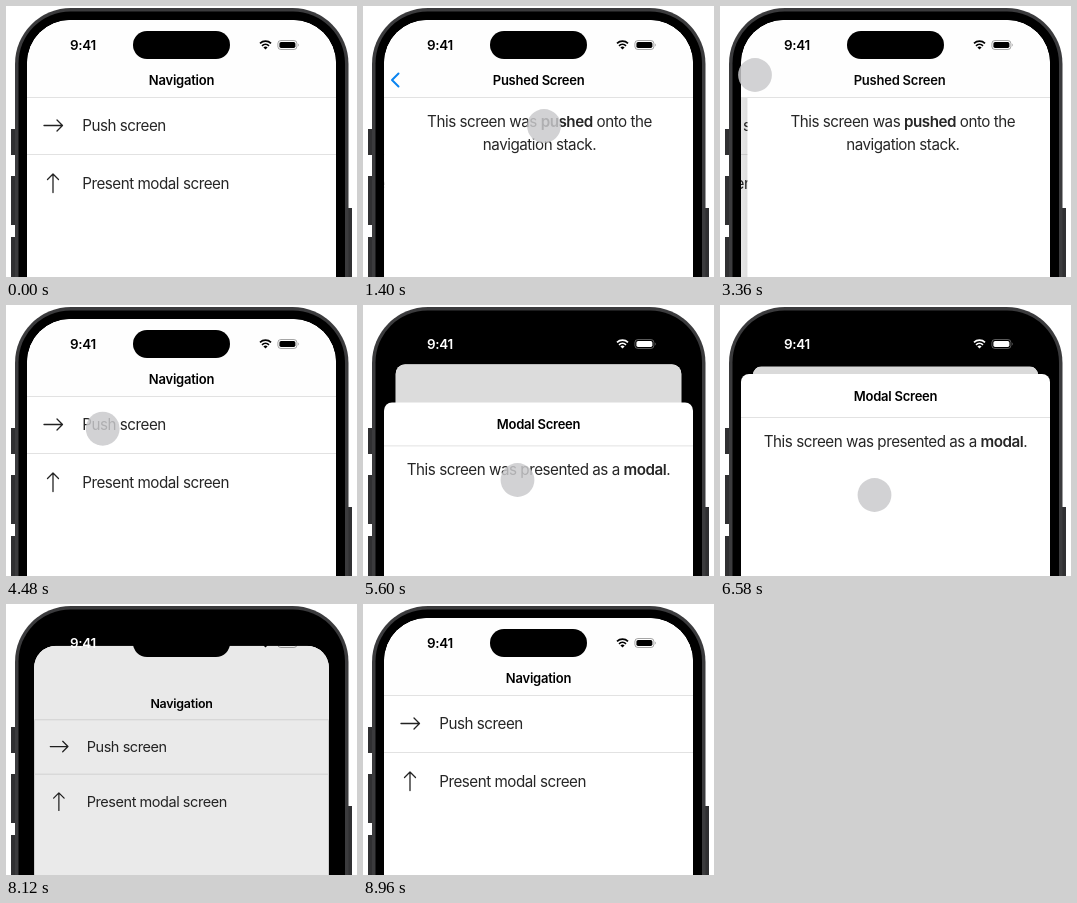
Animation, 351 px wide and 271 px high, one loop 9430 ms. Source, as an HTML page:

```html
<!DOCTYPE html>
<html lang="en">
<head>
<meta charset="utf-8">
<title>Stack navigation</title>
<style>
  html, body { margin: 0; width: 100%; height: 100%; overflow: hidden; background: #fff; }
  svg { display: block; font-family: Inter, "Liberation Sans", sans-serif; }
  text { font-size: 15.2px; letter-spacing: -.031em; fill: #262626; }
  .mid { text-anchor: middle; }
  .title { font-size: 13px; font-weight: 600; letter-spacing: -.018em; fill: #000; }
  .bold { font-weight: 600; }
  .line { stroke: #e2e2e2; }
  .icon { fill: none; stroke: #222; stroke-width: 1.3; stroke-linecap: round; stroke-linejoin: round; }
</style>
</head>
<body>
<svg width="351" height="271" viewBox="0 0 351 271">
  <defs>
    <clipPath id="screenClip"><rect x="21" y="14" width="309" height="400" rx="43"/></clipPath>
    <clipPath id="cardClip"><rect id="cardShape" x="21" y="14" width="309" height="600"/></clipPath>
    <linearGradient id="edge"><stop stop-opacity="0"/><stop offset="1" stop-opacity=".07"/></linearGradient>
  </defs>

  <!-- phone body -->
  <path d="M5 123h6v26H5zM5 170h6v49H5zM5 231h6v49H5zM340 202h6v80h-6z" fill="#303032"/>
  <rect x="9" y="2" width="333.5" height="400" rx="56" fill="#3b3b3d"/>
  <rect x="12.5" y="5.5" width="326.5" height="400" rx="52"/>

  <g clip-path="url(#screenClip)">
    <g id="card"><g clip-path="url(#cardClip)">
      <rect x="21" y="14" width="309" height="600" fill="#fff"/>
      <g id="root">
        <path class="icon" d="M38 119.5h18.5M51 114l5.5 5.5L51 125M47 186.5V168M41.5 173.5L47 168l5.5 5.5"/>
        <text x="76.2" y="125">Push screen</text>
        <text x="76.2" y="183">Present modal screen</text>
        <path class="line" d="M21 148.5h309"/>
      </g>
      <rect id="shade" x="21" y="92" width="309" height="500"/>
      <g id="pushed">
        <rect x="9" y="92" width="12" height="500" fill="url(#edge)"/>
        <rect x="21" y="92" width="309" height="500" fill="#fff"/>
        <text class="mid" x="176.3" y="120.5">This screen was <tspan class="bold">pushed</tspan> onto the</text>
        <text class="mid" x="176.3" y="143.5">navigation stack.</text>
      </g>
      <rect x="21" y="14" width="309" height="78" fill="#fefefe"/>
      <path class="line" d="M21 91.5h309"/>
      <text id="rootTitle" class="mid title" x="175.5" y="79">Navigation</text>
      <text id="pushedTitle" class="mid title" x="175.5" y="79">Pushed Screen</text>
      <path id="back" d="M35.5 67.5L29 74l6.5 6.5" fill="none" stroke="#0a84f0" stroke-width="2" stroke-linecap="round" stroke-linejoin="round"/>
      <rect id="dim" x="21" y="14" width="309" height="600"/>
    </g></g>

    <text id="clock" class="mid title" x="77" y="44" style="font-size:13.4px">9:41</text>
    <g id="status">
      <path d="M254 37.4a8 8 0 0 1 11 0M256 39.8a5.2 5.2 0 0 1 7 0" fill="none" stroke="currentColor" stroke-width="1.7"/>
      <path d="M257.4 41.4a3.2 3.2 0 0 1 4.2 0L259.5 43.6z" fill="currentColor"/>
      <rect x="271.9" y="34.5" width="19" height="9" rx="3" fill="none" stroke="currentColor" stroke-opacity=".35"/>
      <rect x="273.4" y="36" width="16" height="6" rx="1.7" fill="currentColor"/>
      <path d="M292 37.5q1.5 1.5 0 3z" fill="currentColor" opacity=".45"/>
    </g>
    <rect x="127" y="25" width="97" height="28" rx="14"/>

    <g id="modal">
      <rect x="21" y="69" width="309" height="700" rx="8" fill="#fff"/>
      <path class="line" d="M21 112.5h309"/>
      <text class="mid title" x="175.5" y="95.5">Modal Screen</text>
      <text class="mid" x="175.5" y="141.5">This screen was presented as a <tspan class="bold">modal</tspan>.</text>
    </g>
  </g>
  <circle id="touch" r="16.9" fill="#cacacc"/>
</svg>

<script>
const LOOP = 9430, WIDTH = 309, TRAVEL = 600;
const PUSH = 640, POP = 3344, PRESENT = 5120, DRAG = 7000, DISMISS = 7980;
const $ = id => document.getElementById(id);
const clamp = u => Math.min(1, Math.max(0, u));
const part = (t, from, to) => clamp((t - from) / (to - from));
const smooth = u => u * u * (3 - 2 * u);
const easeOut = u => 1 - (1 - u) ** 2;
const spring = (t, rate) => t <= 0 ? 0 : 1 - (1 + rate * t) * Math.exp(-rate * t);
const set = (id, attrs) => {
  for (const key in attrs) $(id).setAttribute(key, attrs[key]);
};
const move = (x, y = 0) => `translate(${x} ${y})`;

// Finger travel: [start, end, dx, dy]
const moves = [
  [1980, 2920, -146, -51],
  [4200, 4750, 119.5, 106],
  [5600, 6060, 0, 15]
];

function draw(t) {
  const push = t < POP ? spring(t - PUSH, .013) : 1 - spring(t - POP, .013);
  const offset = (1 - push) * WIDTH;
  set('root', { transform: move(-.3 * WIDTH * push) });
  set('shade', { opacity: .07 * push });
  set('pushed', { transform: move(offset), opacity: push > .001 ? 1 : 0 });
  set('rootTitle', { transform: move(-125 * push), opacity: clamp(1 - 1.6 * push) });
  set('pushedTitle', { transform: move(.62 * offset), opacity: clamp(1.6 * push - .6) });
  set('back', { opacity: t < POP ? clamp(2 * push - 1) : 0 });

  const drag = 21 * smooth(part(t, DRAG, DISMISS)) +
    (TRAVEL - 21) * easeOut(part(t, DISMISS, DISMISS + 640));
  const modal = t < DRAG ? spring(t - PRESENT, .01) : 1 - drag / TRAVEL;
  set('card', {
    transform: `translate(175.5 ${14 + 47.5 * modal}) scale(${1 - .078 * modal}) translate(-175.5 -14)`
  });
  set('cardShape', { rx: 43 - 34 * modal });
  set('dim', { opacity: .14 * modal });
  set('modal', { transform: move(0, (1 - modal) * TRAVEL) });
  $('clock').style.fill = t > 5350 && t < 8250 ? '#fff' : '#000';
  $('status').style.color = t > 5350 && t < 8100 ? '#fff' : '#000';

  let x = 181, y = 120 + drag;
  for (const [from, to, dx, dy] of moves) {
    const u = smooth(part(t, from, to));
    x += dx * u;
    y += dy * u;
  }
  set('touch', { cx: x, cy: y, opacity: .84 * part(t, 350, 490) * (1 - part(t, 8050, 8110)) });
}

function tick() {
  draw(performance.now() % LOOP);
  requestAnimationFrame(tick);
}
tick();
</script>
</body>
</html>
```
